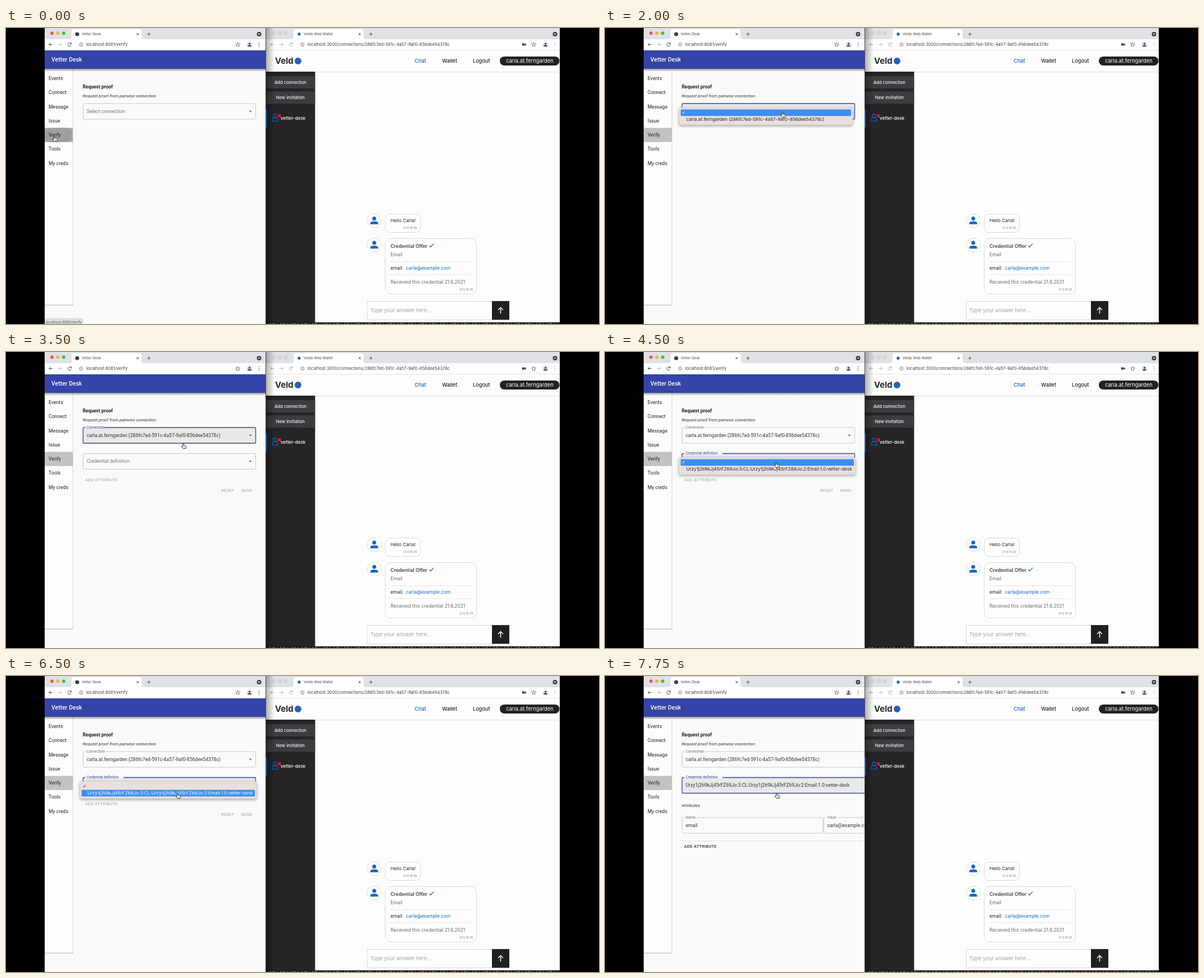
An HTML page that plays this animation: 1058x529 px, repeating every 8 s.

```html
<!DOCTYPE html>
<html lang="en">
<head>
<meta charset="utf-8">
<title>Proof request demo</title>
<style>
html, body { margin: 0; width: 100%; height: 100%; overflow: hidden; background: #000; }
svg { display: block; width: 1058px; height: 529px; }
text { white-space: pre; }
.ui { font-family: Roboto, sans-serif; }
.sys { font-family: Inter, sans-serif; }
</style>
</head>
<body>
<svg id="stage" viewBox="0 0 1058 529">
  <defs>
    <clipPath id="page"><rect x="69" y="40" width="394" height="489"/></clipPath>
    <filter id="shadow" x="-10%" y="-30%" width="120%" height="190%">
      <feDropShadow dx="0" dy="2" stdDeviation="2.5" flood-opacity=".35"/>
    </filter>
    <linearGradient id="side"><stop stop-opacity=".3"/><stop offset="1" stop-opacity="0"/></linearGradient>
    <linearGradient id="under" x2="0" y2="1"><stop stop-opacity=".38"/><stop offset="1" stop-opacity="0"/></linearGradient>
  </defs>
  <g id="fixed"></g>
  <g id="live" clip-path="url(#page)"></g>
  <g id="hand">
    <path d="M-1.7-4.2q1-1 1.8 0v3l3.4.8q1.2.4 1 1.8l-.6 3.2h-4.8l-3-3.6q.2-1.4 2.2-.2z"
      fill="#fff" stroke="#222" stroke-width=".9" stroke-linejoin="round"/>
    <path d="M.3 1v2M2 1v2" stroke="#444" stroke-width=".5"/>
  </g>
</svg>
<script>
const LOOP = 8000, STEP = 250;
const INDIGO = '#3444a8', BLUE = '#1267d3', INK = '#242424', GREY = '#757575', PAPER = '#fafaf9';
const USER = 'carla.at.ferngarden', MAIL = 'carla@example.com';
const APP = 'Vetter Desk', AGENT = 'vetter-desk';
const UUID = '286fc7ed-591c-4a57-9af0-856dee54378c';
const PAIR = `${USER} (${UUID})`;
const CRED = `Urzy1j2ti9kJj45rFZ69Jo:3:CL:Urzy1j2ti9kJj45rFZ69Jo:2:Email:1.0:${AGENT}`;
const $ = id => document.getElementById(id);

// Text is placed by its left edge and the middle of its capitals.
const text = (cls, x, y, s, size, fill = INK, more = '') =>
  `<text class="${cls}" x="${x}" y="${y + size * .36}" font-size="${size}" fill="${fill}" ${more}>${s}</text>`;
const ui = (...a) => text('ui', ...a);
const sys = (...a) => text('sys', ...a);
const rect = (x, y, w, h, fill, more = '') =>
  `<rect x="${x}" y="${y}" width="${w}" height="${h}" fill="${fill}" ${more}/>`;
const dot = (x, y, r, fill, more = '') => `<circle cx="${x}" cy="${y}" r="${r}" fill="${fill}" ${more}/>`;
const line = (d, color, w = 1, more = '') =>
  `<path d="${d}" fill="none" stroke="${color}" stroke-width="${w}" ${more}/>`;
const person = (x, y, s, fill) => dot(x, y - 3.4 * s, 3.5 * s, fill) +
  `<path d="M${x - 7 * s} ${y + 7 * s}v${-1.9 * s}q0 ${-3.4 * s} ${7 * s} ${-3.4 * s}t${7 * s} ${3.4 * s}v${1.9 * s}z" fill="${fill}"/>`;

function chrome(x, w, o) {
  const c = o.ink;
  let s = rect(x, 0, w, 22, '#dee1e6') + rect(x, 20, w, 20, '#fff');
  o.lights.forEach((f, i) => s += dot(x + o.light + i * 10.5, 9.3, 3, f, o.ring));
  s += `<path d="M${o.tab - 4} 20q4 0 4-4v-10q0-4 4-4h${o.tabW - 8}q4 0 4 4v10q0 4 4 4z" fill="#fff"/>`;
  s += dot(o.tab + 10, 11, o.icon, o.iconFill);
  s += sys(o.tab + 18, 11, o.title, 6.3, '#444');
  const cx = o.tab + o.tabW - 7, px = o.tab + o.tabW + 13;
  s += line(`M${cx - 2} 9l4 4m0-4l-4 4M${px - 3} 11h6m-3-3v6`, '#444', .9);
  s += dot(o.menu, 11, 4, '#3c4043') + `<path d="M${o.menu - 2} 10h4l-2 2.5z" fill="#fff"/>`;
  const b = x + 11;
  s += line(`M${b + 3} 29.5h-6m2.6-2.8l-2.8 2.8 2.8 2.8`, c, 1);
  s += line(`M${b + 13} 29.5h6m-2.6-2.8l2.8 2.8-2.8 2.8`, '#b5b8bc', 1);
  s += line(`M${b + 36} 28a3 3 0 1 0 .2 2.5m.2-4.2v2.2h-2.2`, c, 1);
  s += dot(o.url - 9, 29.5, 3, 'none', 'stroke="#5f6368" stroke-width=".8"');
  s += line(`M${o.url - 9} 29v2m0-3.3v.7`, '#5f6368', .8);
  s += sys(o.url, 29.5, o.address, 7.5, '#3c4043');
  s += line(`M${o.star} 25.7l1.1 2.6 2.8.2-2.1 1.8.7 2.8-2.5-1.5-2.5 1.5.7-2.8-2.1-1.8 2.8-.2z`, '#555', .8);
  s += dot(o.star + 21, 29.5, 5.2, '#dfe3ea') + person(o.star + 21, 29.7, .46, '#31445f');
  for (const y of [26.5, 29.5, 32.5]) s += dot(o.dots, y, .8, c);
  return s + rect(x, 39, w, .8, '#ddd');
}

function wallet() {
  let s = rect(464, 0, 524, 529, '#fdfdfc');
  s += chrome(464, 524, {
    light: 14, lights: Array(3).fill('#d5d7da'), ring: 'stroke="#b9bbbe" stroke-width=".6"',
    tab: 513, tabW: 125, icon: 2.7, iconFill: BLUE, title: 'Veldo Web Wallet', menu: 979.5,
    url: 538, address: `localhost:3000/connections/${UUID}`, star: 941.5, dots: 979.5, ink: '#a6a9ad'
  });
  s += rect(921, 27.5, 4.6, 4, '#444') + '<path d="M925.6 29l2.4-1.5v4l-2.4-1.5z" fill="#444"/>';
  s += rect(551, 78, 437, .8, '#dcdcd4');
  s += sys(480, 59, 'Veld', 15, '#25282d', 'font-weight="700"') + dot(521, 59, 6, '#2563b8');
  s += sys(729, 58.7, 'Chat', 9.2, BLUE, 'font-weight="500"');
  s += sys(778, 58.7, 'Wallet', 9.2, INK, 'font-weight="500"');
  s += sys(833, 58.7, 'Logout', 9.2, INK, 'font-weight="500"');
  s += rect(881, 51, 106.5, 16, '#222225', 'rx="8"') +
    sys(934.5, 58.8, USER, 9.4, '#fff', 'text-anchor="middle"');

  s += rect(464, 78, 87.5, 449, '#252527');
  [['Add connection', 97], ['New invitation', 124.3]].forEach(([t, y]) => {
    s += rect(464, y - 11, 87.3, 22, '#3c3c40') +
      sys(507.5, y, t, 7.55, '#f4f4f4', 'font-weight="500" text-anchor="middle"');
  });
  s += dot(480, 157, 3.2, 'none', `stroke="${BLUE}" stroke-width="1.2"`);
  s += line('M475 166.5v-2q0-3 3-4h4q3 1 3 4v2z', BLUE, 1.2) + dot(488, 157, 2.9, '#e8131b');
  s += sys(490, 161.3, AGENT, 8.05, '#fff', 'font-weight="500"');

  const edge = 'stroke="#d6d6d2" stroke-width=".9"';
  for (const y of [344.5, 388]) s += dot(657, y, 12.5, '#fff', edge) + person(657, y - .7, 1, BLUE);
  s += rect(676.5, 332.5, 63, 33, '#fefefe', edge + ' rx="9"');
  s += sys(686, 344.3, 'Hello Carla!', 8.2) + sys(709, 357, '21.6 16:25', 5.2, GREY);
  s += rect(676.5, 376.5, 163, 99, '#fefefe', edge + ' rx="10"');
  s += sys(686, 389.5, 'Credential Offer', 8.45, '#555', 'font-weight="700"');
  s += line('M755.5 389l2.3 2.5 5-5.8', BLUE, 1.2);
  s += sys(686, 405.5, 'Email', 8.3, '#666') + sys(686, 428.7, 'email:', 8.3);
  s += sys(713.5, 428.7, MAIL, 8.3, BLUE);
  s += rect(686, 417.5, 145, .8, '#ddd') + rect(686, 440.5, 145, .8, '#ddd');
  s += sys(686, 453.5, 'Received this credential 21.6.2021', 8.35, '#666');
  s += sys(809, 467.3, '21.6 16:25', 5.2, GREY);
  s += rect(644.5, 488.5, 223, 33, '#fefefe', edge);
  s += sys(650, 505, 'Type your answer here...', 9.3, '#a3a3a3');
  s += rect(867, 488, 31, 33.5, '#202022');
  s += line('M882.5 510.5v-11m-4.5 4.5l4.5-4.5 4.5 4.5', '#fff', 1.4);

  // The front window's shadow, and the desktop showing below.
  s += rect(463, 0, 1, 529, '#4a4a4c') + rect(464, 0, 15, 527, 'url(#side)');
  s += rect(463.3, 145, 1.8, 33, '#1769d2');
  return s + rect(464, 526, 524, 3, '#161616') +
    line('M470 528h514', '#8a8a8a', 1, 'stroke-dasharray="3 2 5 3 2 4"');
}

function issuer() {
  let s = rect(69, 0, 394, 529, PAPER);
  s += chrome(69, 394, {
    light: 13, lights: ['#f4554d', '#f6b72e', '#35c144'], ring: '',
    tab: 117, tabW: 125, icon: 3.6, iconFill: '#3c4043', title: APP, menu: 451.5,
    url: 143, address: 'localhost:8081/verify', star: 413.5, dots: 451.5, ink: '#444'
  });
  s += rect(69, 73, 50, 422, '#fdfdfc') + line('M119.5 74v421', '#cfcfcc', .9);
  s += line('M69 495.2h50.5', '#999', .8);
  s += rect(69, 73, 394, 5, 'url(#under)');
  return s + rect(69, 40, 394, 33, INDIGO) +
    ui(81, 56.6, APP, 10.4, '#fff', 'font-weight="500" letter-spacing=".05"');
}

// An outlined select or input, with its label resting inside or notched into the top edge.
function field(x, y, w, label, value, { floated = !!value, focus, arrow } = {}) {
  const color = focus ? INDIGO : '#c2c2bf';
  let s = rect(x + .5, y + .5, w - 1, 28, focus ? '#e9e9e9' : 'none',
    `rx="2" stroke="${color}" stroke-width="${focus ? 1.3 : .9}"`);
  if (floated) {
    const notch = label.length * 3.05 + 4;
    s += rect(x + 4.5, y - 1, notch, 3, PAPER);
    s += ui(x + 7, y, label, 6.45, focus ? INDIGO : GREY);
  } else if (label) s += ui(x + 7, y + 14, label, 8.6, GREY);
  if (value) s += ui(x + 7, y + 14.4, value, 8.6, '#333');
  if (arrow) s += `<path d="M${x + w - 12.7} ${y + 13.2}h5.4l-2.7 2.7z" fill="#666"/>`;
  return s;
}

// A native option list: an empty first entry and one choice; pick is the lit row.
function menu(y, w, option, pick) {
  let s = rect(132, y, w, 31, '#e9dfdd', 'rx="3.5" stroke="#c9c2c0" stroke-width=".6" filter="url(#shadow)"');
  if (pick >= 0) s += rect(135, y + 3.6 + pick * 12, w - 6, 11.6, '#398ff6', 'rx="1.5"');
  s += line(`M138 ${y + 9.2}l1.3 1.7 2.4-4.2`, pick === 0 ? '#fff' : '#222', .9);
  return s + sys(145, y + 21.2, option, 8.15, pick === 1 ? '#fff' : INK);
}

const button = (x, y, s, on) =>
  ui(x, y, s, 7.5, on ? '#333' : '#b3b3b3', 'font-weight="500" letter-spacing=".2"');

function form(t) {
  const chosen = t >= 3250, open2 = t >= 4500 && t < 7000, done = t >= 7000;
  const wide = done ? 420 : 309;
  let s = rect(69, 178.5, 50, 25.3, t < 750 ? '#adadad' : '#c2c2c2');
  if (t < 250) s += rect(69, 178.5, 48, 25.3, '#9f9f9f', 'rx="9"');
  ['Events', 'Connect', 'Message', 'Issue', 'Verify', 'Tools', 'My creds'].forEach((label, i) => {
    s += ui(76, 90 + i * 25.25, label, 8.6, '#222', 'letter-spacing=".04"');
  });
  s += ui(136.7, 104.6, 'Request proof', 8.5, '#222', 'font-weight="700"');
  s += ui(136.7, 120.8, 'Request proof from pairwise connection', 7.6, '#333', 'font-style="italic"');

  if (!chosen) {
    const open = t >= 1750, late = t >= 2500;
    s += field(137, 134.5, 309, open && !late ? '' : 'Select connection', '',
      { floated: late, focus: open, arrow: true });
    if (open) s += menu(142, 310, PAIR, t >= 3000 ? -1 : late ? 1 : 0);
  } else {
    s += field(137, 134.5, wide, 'Connection', PAIR, { focus: t < 4500, arrow: true });
    s += field(137, 181, wide, 'Credential definition', done ? CRED : '',
      { floated: open2 || done, focus: open2 || done, arrow: true });
    if (done) {
      s += ui(136.7, 231.5, 'Attributes', 7.5, '#333');
      s += field(137, 252.5, 252.5, 'Name', 'email') + field(389.5, 252.5, 170, 'Value', MAIL);
      s += rect(137, 294.5, 327, .8, '#d5d5dc') + button(141, 304.6, 'ADD ATTRIBUTE', true);
    } else {
      s += button(141, 228.2, 'ADD ATTRIBUTE') + button(384, 247.2, 'RESET') + button(419.5, 247.2, 'SEND');
    }
    if (open2) s += menu(188, 315, CRED, t < 4750 ? 0 : t >= 5500 && t < 6750 ? 1 : -1);
  }
  if (t < 750) s += rect(69, 519.5, 68, 10, '#dfe1e5', 'rx="2" stroke="#c3c5c8" stroke-width=".7"') +
    sys(71, 525.3, 'localhost:8081/verify', 6.5, '#555');
  return s;
}

// Pointer stops: time, x, y.
const STOPS = [[250, 87, 198], [1500, 317, 155], [2250, 317, 155], [2500, 317, 168], [3500, 317, 168],
  [4250, 306, 199], [4500, 306, 202], [5000, 306, 222], [5250, 306, 222], [5500, 307, 214]];

function pointer(t) {
  const i = STOPS.findIndex(s => s[0] > t);
  if (i < 1) return (i ? STOPS[STOPS.length - 1] : STOPS[0]).slice(1);
  const a = STOPS[i - 1], b = STOPS[i], p = (t - a[0]) / (b[0] - a[0]), e = p * p * (3 - 2 * p);
  return [1, 2].map(k => a[k] + (b[k] - a[k]) * e);
}

$('fixed').innerHTML = issuer() + wallet();
const start = performance.now();
let shown = -1;
function tick() {
  const t = Math.floor((performance.now() - start) % LOOP / STEP) * STEP;
  if (t !== shown) {
    shown = t;
    $('live').innerHTML = form(t);
    $('hand').setAttribute('transform', `translate(${pointer(t)})`);
  }
  requestAnimationFrame(tick);
}
tick();
</script>
</body>
</html>
```
